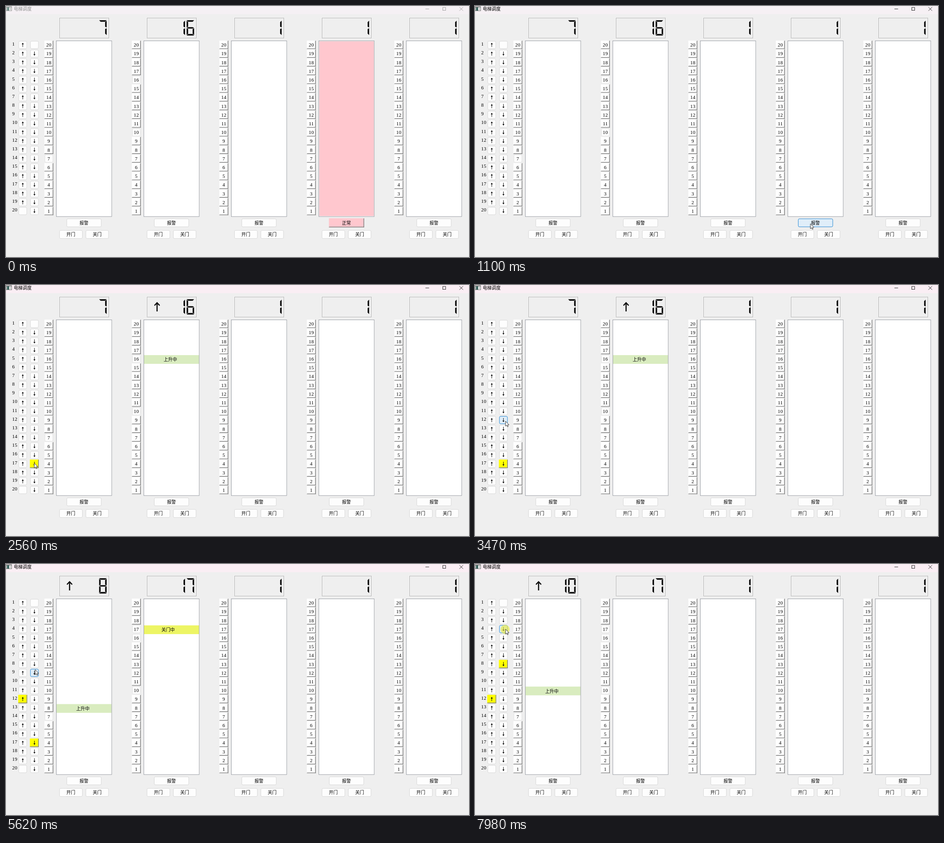
Animation, 1016 px wide and 551 px high, one loop 8 s. Source, as an HTML page with a canvas:

```html
<!DOCTYPE html>
<html lang="zh">
<head>
<meta charset="utf-8">
<title>电梯调度</title>
<style>
  html, body { margin: 0; width: 100%; height: 100%; overflow: hidden; background: #efefef; }
  canvas { display: block; width: 100%; height: 100%; }
</style>
</head>
<body>
<canvas id="stage" width="1016" height="551"></canvas>
<script>
const ctx = document.getElementById('stage').getContext('2d');
const LOOP = 8000, STEP = 19.2, COL = 192;
const PX = .8; // one window pixel on the stage
const CJK = '9.8px "Noto Sans CJK SC", "Noto Sans CJK JP", sans-serif';
const NUM = '11px "Liberation Serif", serif';

// time, x, y of the pointer tip
const PATH = [
  [70, 905, 551], [780, 736, 478], [1640, 736, 478], [1740, 560, 476],
  [1870, 160, 391], [2150, 62, 391], [2770, 62, 391], [3400, 67, 299],
  [3600, 67, 299], [4000, 30, 297], [5220, 30, 297], [5560, 64, 232],
  [6110, 64, 232], [6640, 65, 219], [7140, 65, 219], [7880, 67, 143]
];
const CLICKS = [[950, 1020], [2400, 2530], [4300, 4450], [6940, 7140], [7980, 8000]];
// lit call buttons: direction, floor, from, to
const CALLS = [['down', 17, 2530, 6530], ['up', 12, 4450, LOOP], ['down', 8, 7140, LOOP]];
const ALARM_END = 1020;
// segments: top, upper left, upper right, middle, lower left, lower right, bottom
const DIGITS = ['012456', '25', '02346', '02356', '1235', '01356', '013456', '025', '0123456', '012356'];

const within = (t, a, b) => t >= a && t < b;

function pointer(t) {
  if (t < PATH[0][0]) return null;
  let i = 0;
  while (i < PATH.length - 1 && PATH[i + 1][0] <= t) i++;
  const a = PATH[i], b = PATH[i + 1];
  if (!b) return { x: a[1], y: a[2] };
  const k = (t - a[0]) / (b[0] - a[0]), e = k * k * (3 - 2 * k);
  return { x: a[1] + (b[1] - a[1]) * e, y: a[2] + (b[2] - a[2]) * e };
}

const inside = (p, x, y, w, h) => p && p.x >= x && p.x < x + w && p.y >= y && p.y < y + h;

// hover fades in and out: share of the last moments spent over the box
function glow(t, x, y, w, h) {
  let n = 0;
  for (let k = 0; k < 5; k++) if (inside(pointer(t - k * 40), x, y, w, h)) n++;
  return n / 5;
}

function rect(x, y, w, h, color) {
  ctx.fillStyle = color;
  ctx.fillRect(x, y, w, h);
}

function frame(x, y, w, h, color) {
  ctx.strokeStyle = color;
  ctx.lineWidth = PX;
  ctx.strokeRect(x + PX / 2, y + PX / 2, w - PX, h - PX);
}

function text(str, x, y, font, align = 'center', color = '#000') {
  ctx.font = font;
  ctx.letterSpacing = font === NUM ? '.3px' : '0px';
  ctx.textAlign = align;
  ctx.textBaseline = 'alphabetic';
  ctx.fillStyle = color;
  ctx.fillText(str, x, y);
}

function poly(points, color) {
  ctx.beginPath();
  points.forEach(([x, y]) => ctx.lineTo(x, y));
  ctx.closePath();
  ctx.fillStyle = color;
  ctx.fill();
}

function line(points, color, width) {
  ctx.beginPath();
  points.forEach(([x, y]) => ctx.lineTo(x, y));
  ctx.strokeStyle = color;
  ctx.lineWidth = width;
  ctx.stroke();
}

function rounded(x, y, w, h, fill, edge) {
  ctx.beginPath();
  ctx.roundRect(x + PX / 2, y + PX / 2, w - PX, h - PX, 2.5);
  ctx.fillStyle = fill;
  ctx.fill();
  ctx.strokeStyle = edge;
  ctx.lineWidth = PX;
  ctx.stroke();
}

function flat(t, x, y, w, h, edge = '#d0d0d0') {
  rounded(x, y, w, h, '#fdfdfd', edge);
  const g = glow(t, x, y, w, h);
  if (!g) return;
  ctx.globalAlpha = g;
  rounded(x, y, w, h, '#e0eef9', '#0078d4');
  ctx.globalAlpha = 1;
}

function raised(x, y, w, h, fill) {
  const r = x + w, b = y + h;
  rect(x, y, w, h, fill);
  rect(x + PX, b - 2 * PX, w - 2 * PX, PX, '#a0a0a0');
  rect(r - 2 * PX, y + PX, PX, h - 2 * PX, '#a0a0a0');
  rect(x, b - PX, w, PX, '#696969');
  rect(r - PX, y, PX, h, '#696969');
}

function smallArrow(x, y, dir) {
  const s = dir === 'up' ? 1 : -1;
  line([[x, y - 3 * s], [x, y + 4.5 * s]], '#000', .95);
  poly([[x, y - 4.5 * s], [x + 2.2, y - 1.2 * s], [x - 2.2, y - 1.2 * s]], '#000');
}

function digit(n, x, y) {
  const r = 16.4, w = 3.2, m = 16.8, b = 33.6;
  const side = (x0, s, lower) => lower
    ? [[x0, m + 1], [x0 + s * w, m + 2.4], [x0 + s * w, b - w - 1], [x0, b - 1]]
    : [[x0, 1], [x0 + s * w, w + 1], [x0 + s * w, m - 2.4], [x0, m - 1]];
  const shapes = [
    [[0, 0], [r, 0], [r - w, w], [w, w]],
    side(0, 1, false), side(r, -1, false),
    [[0, m], [w, m - 1.6], [r - w, m - 1.6], [r, m], [r - w, m + 1.6], [w, m + 1.6]],
    side(0, 1, true), side(r, -1, true),
    [[0, b], [r, b], [r - w, b - w], [w, b - w]]
  ];
  for (const s of DIGITS[n]) poly(shapes[s].map(([px, py]) => [x + px, y + py]), '#000');
}

function display(x, value, rising) {
  frame(x + 116.4, 25, 108.8, 44.8, '#fff');
  frame(x + 117.2, 25.8, 108.8, 44.8, '#a0a0a0');
  [...String(value)].reverse().forEach((d, i) => digit(+d, x + 204.4 - i * 20, 31.2));
  if (rising) {
    line([[x + 139.5, 39], [x + 139.5, 58]], '#000', 2.4);
    line([[x + 133.8, 45], [x + 139.5, 39], [x + 145.2, 45]], '#000', 2.4);
  }
}

const rowTop = floor => 153.9 + (16 - floor) * STEP;

function elevators(t) {
  const cars = [7, 16, 1, 1, 1].map(floor => ({ floor, stops: [] }));
  cars[0].stops = [7];
  cars[1].stops = [16, 10];
  if (t >= 4500) {
    cars[0].floor = 7 + Math.floor((t - 4500) / 1000);
    cars[0].label = '上升中';
  }
  if (t >= 3530) {
    cars[1].floor = 17;
    cars[1].stops.push(17);
    if (t < 6530) cars[1].label = t < 5530 ? '开门中' : '关门中';
  } else if (t >= 2530) cars[1].label = '上升中';
  cars[3].alarm = t < ALARM_END;
  return cars;
}

function drawCar(t, car, i) {
  const x = i * COL, p = pointer(t), rising = car.label === '上升中';
  display(x, car.floor, rising);

  for (let f = 20; f >= 1; f--) {
    const y = 76 + (20 - f) * STEP;
    if (car.stops.includes(f)) flat(t, x + 85, y + .8, 18.2, 17, '#dedede');
    else raised(x + 84.2, y, 19.6, 18.4, '#fefefe');
    text(f, x + 94, y + 13.2, NUM);
  }

  rect(x + 110, 76, 122.4, 386.6, '#fff');
  if (car.alarm) rect(x + 111.6, 77.6, 119.6, 383.4, '#ffc7ce');
  if (inside(p, x + 111, 77, 120, 385)) {
    const f = 20 - Math.floor((p.y - 77) / STEP);
    rect(x + 111, rowTop(f), 120, STEP, '#e5f3ff');
  }
  if (car.label) {
    const y = rowTop(car.floor);
    rect(x + 111, y, 120.6, STEP, rising ? '#d9ecbf' : '#edf564');
    text(car.label, x + (rising ? 154 : 149), y + 13.5, CJK, 'left');
  }
  frame(x + 110, 76, 122.4, 386.6, '#828790');

  if (car.alarm) raised(x + 132.6, 466, 77.4, 20, '#ffc7ce');
  else flat(t, x + 133, 466.8, 76.4, 18.4);
  text(car.alarm ? '正常' : '报警', x + 171, 479.7, CJK);
  flat(t, x + 117, 492.2, 51, 18.6);
  text('开门', x + 142.3, 505.3, CJK);
  flat(t, x + 174.8, 492.2, 50.6, 18.6);
  text('关门', x + 200, 505.3, CJK);
}

function drawCalls(t) {
  for (let f = 1; f <= 20; f++) {
    const y = 76 + (f - 1) * STEP;
    text(f, 13.5, 87 + (f - 1) * 19.16, NUM, 'left');
    for (const [dir, x, blank] of [['up', 27.6, 20], ['down', 53.2, 1]]) {
      const lit = CALLS.some(c => c[0] === dir && c[1] === f && within(t, c[2], c[3]));
      if (lit) raised(x - .8, y, 19.6, 18.4, '#ff0');
      else flat(t, x, y + .8, 18.4, 17);
      if (f !== blank) smallArrow(x + 9.2, y + 9.3, dir);
    }
  }
}

function drawTitle(t) {
  const active = t >= ALARM_END, ink = active ? '#000' : '#8f8f8f';
  const k = Math.min(1, Math.max(0, (t - ALARM_END) / 400));
  rect(0, 0, 1016, 18, `rgb(${245 + 5 * k}, ${240 - 2 * k}, 244)`);
  rect(0, 1, 13, 10, active ? '#777' : '#999');
  rect(1, 3, 11, 7, '#f8f8f8');
  rect(2, 3, 5, 7, active ? '#3d655f' : '#72908b');
  rect(9, 4, 2, 5, '#b9b9b9');
  text('电梯调度', 17, 10, CJK, 'left', ink);
  rect(920.4, 6, 8, PX, ink);
  frame(958, 2.8, 7.2, 7.2, ink);
  line([[995, 2.5], [1003, 10.5]], ink, PX);
  line([[1003, 2.5], [995, 10.5]], ink, PX);
}

function drawPointer(t) {
  const p = pointer(t);
  if (!p) return;
  if (CLICKS.some(([a, b]) => within(t, a, b))) {
    ctx.beginPath();
    ctx.arc(p.x - 1, p.y + .5, 10, 0, Math.PI * 2);
    ctx.fillStyle = 'rgba(236, 236, 60, .62)';
    ctx.fill();
  }
  const shape = [[0, 0], [0, 11], [2.5, 8.7], [4.2, 12.3], [5.9, 11.6], [4.3, 8.1], [7.7, 8]]
    .map(([x, y]) => [p.x + x, p.y + y]);
  poly(shape, '#fff');
  line([...shape, shape[0]], '#222', .9);
}

function draw(t) {
  rect(0, 0, 1016, 551, '#efefef');
  drawTitle(t);
  drawCalls(t);
  elevators(t).forEach((car, i) => drawCar(t, car, i));
  drawPointer(t);
}

const start = performance.now();
function tick() {
  draw((performance.now() - start) % LOOP);
  requestAnimationFrame(tick);
}
tick();
</script>
</body>
</html>
```
